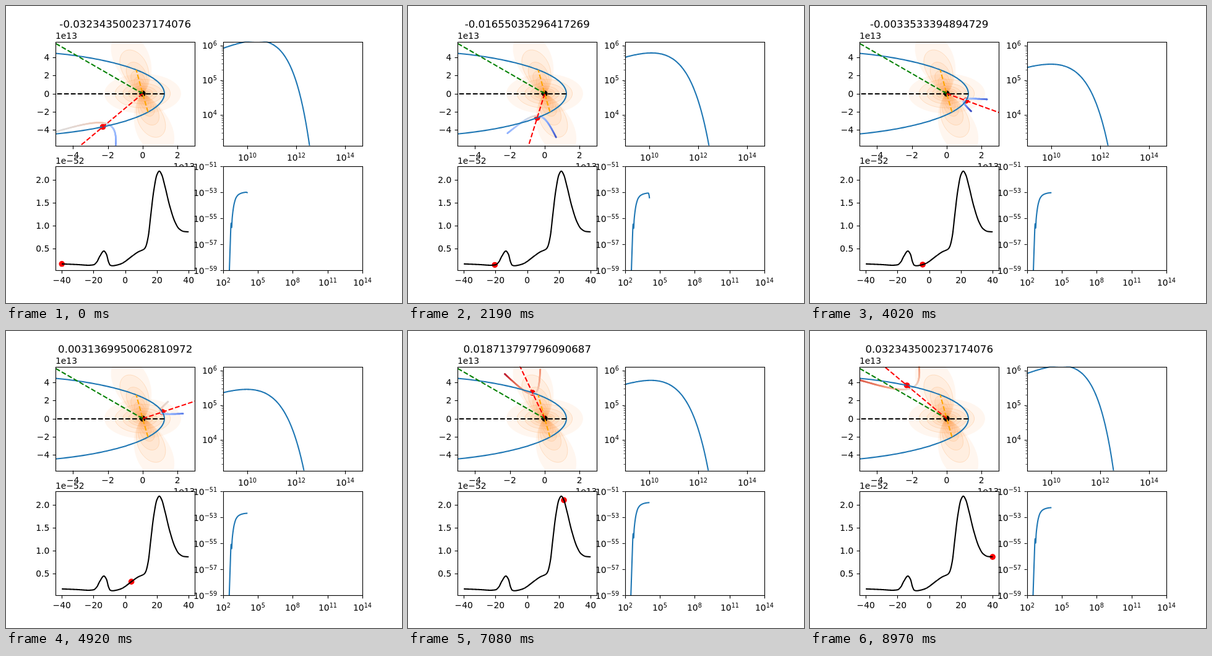
An HTML page with a canvas that plays this animation: 640 by 480 pixels, repeating every 9 s.

```html
<!DOCTYPE html>
<html lang="en">
<head>
<meta charset="utf-8">
<title>Binary orbit and spectra</title>
<style>
html, body { margin: 0; width: 100%; height: 100%; overflow: hidden; background: #fff; }
canvas { display: block; width: 640px; height: 480px; }
</style>
</head>
<body>
<canvas id="c" width="640" height="480"></canvas>
<script>
const g = document.getElementById('c').getContext('2d');
const FONT = '"DejaVu Sans", sans-serif';
const STEPS = 300, STEP_MS = 30;
const DAYS = 40, PERIOD = 1236.724526;
const ECC = 0.874, SEMI = 9.86, SEMI_LATUS = SEMI * (1 - ECC * ECC);
const DISK = 98.5, OBSERVER = 132, RAD = Math.PI / 180;
const BLUE = '#1f77b4', LINE = 2.08, DASH = [7.7, 3.33];

// Panels: left, top, right, bottom
const orbitBox = [80, 57.6, 305.45, 225.6];
const sedBox = [350.55, 57.6, 576, 225.6];
const lightBox = [80, 259.2, 305.45, 427.2];
const fluxBox = [350.55, 259.2, 576, 427.2];

const ox = x => 220.9 + 28.18 * x;
const oy = y => 141.6 - 14.62 * y;
const lx = t => 192.72 + 2.5617 * t;
const ly = f => 428.6 - 73.6 * f;
const sx = e => 350.55 + 39.55 * (e - 9);
const sy = l => 63.5 - 56.1 * (l - 6);
const fx = e => 350.55 + 18.788 * (e - 2);
const fy = e => 259.2 - 21 * (e + 51);

// Shape-preserving cubic through [x, y] points
function curve(pts) {
  const n = pts.length;
  const d = pts.slice(1).map((p, i) => (p[1] - pts[i][1]) / (p[0] - pts[i][0]));
  const m = pts.map((p, i) => {
    if (i === 0) return d[0];
    if (i === n - 1) return d[n - 2];
    const a = d[i - 1], b = d[i];
    return a * b > 0 ? 2 * a * b / (a + b) : 0;
  });
  return x => {
    let i = 0;
    while (i < n - 2 && x > pts[i + 1][0]) i++;
    const h = pts[i + 1][0] - pts[i][0], u = (x - pts[i][0]) / h, v = 1 - u;
    return pts[i][1] * (1 + 2 * u) * v * v + m[i] * h * u * v * v
      + pts[i + 1][1] * u * u * (3 - 2 * u) - m[i + 1] * h * u * u * v;
  };
}

const light = curve([
  [-40, .16], [-30, .145], [-23, .131], [-20, .14], [-18, .2], [-16, .33], [-13.5, .443],
  [-11.9, .375], [-10.5, .2], [-9.4, .13], [-8, .12], [-5, .137], [-2, .173], [0, .215],
  [4, .322], [8, .42], [12, .49], [13, .545], [14.6, .78], [16, 1.2], [18, 1.77],
  [20, 2.12], [21.5, 2.197], [23, 2.12], [25, 1.87], [28, 1.44], [31.4, 1.08],
  [34, .93], [37, .872], [40, .863]
]);
const spectrum = curve([
  [358.6, 500], [361, 427], [362.3, 388], [363.9, 351], [364.7, 358], [365.5, 344],
  [367, 330], [369, 318.5], [372, 309.5], [376, 304.7], [381, 302.3], [386, 301.2], [390.3, 300.8]
]);

const warm = [
  [59, 76, 192], [98, 130, 234], [141, 176, 254], [184, 208, 249], [221, 221, 221],
  [245, 196, 173], [244, 154, 123], [222, 96, 77], [180, 4, 38]
];
function heat(v) {
  const p = Math.max(0, Math.min(.9999, v)) * 8, i = Math.floor(p);
  return 'rgb(' + warm[i].map((a, k) => Math.round(a + (warm[i + 1][k] - a) * (p - i))) + ')';
}

function path(pts) {
  g.beginPath();
  pts.forEach(p => g.lineTo(p[0], p[1]));
}
function stroke(pts, color, dash) {
  path(pts);
  g.strokeStyle = color;
  g.lineWidth = LINE;
  g.lineJoin = 'round';
  g.setLineDash(dash || []);
  g.stroke();
  g.setLineDash([]);
}
function sample(n, fn) {
  return Array.from({ length: n + 1 }, (_, i) => fn(i / n));
}
function dot(x, y, color) {
  g.beginPath();
  g.arc(x, y, 4.8, 0, 2 * Math.PI);
  g.fillStyle = color;
  g.fill();
}
function text(s, x, y, align, size = 13.89) {
  g.font = size + 'px ' + FONT;
  g.textAlign = align;
  g.fillStyle = '#000';
  g.fillText(s, x, y);
}
function power(n, x, y, align) {
  const e = String(n).replace('-', '\u2212');
  g.font = '9.72px ' + FONT;
  const we = g.measureText(e).width;
  g.font = '13.89px ' + FONT;
  const wb = g.measureText('10').width, w = wb + we;
  const left = Math.round(align === 'right' ? x - w : x - w / 2);
  text('10', left, y, 'left');
  text(e, left + wb, y - 5, 'left', 9.72);
}

const snap = v => Math.round(v) + .5;
function tick(box, x, y, len, width) {
  g.beginPath();
  if (y === null) {
    g.moveTo(snap(x), box[3]);
    g.lineTo(snap(x), snap(box[3]) + len);
  } else {
    g.moveTo(box[0], snap(y));
    g.lineTo(snap(box[0]) - len, snap(y));
  }
  g.strokeStyle = '#000';
  g.lineWidth = width;
  g.stroke();
}
function panel(box, draw) {
  const [l, t, r, b] = box;
  g.fillStyle = '#fff';
  g.fillRect(l, t, r - l, b - t);
  g.save();
  g.beginPath();
  g.rect(l, t, r - l, b - t);
  g.clip();
  draw();
  g.restore();
  g.strokeStyle = '#000';
  g.lineWidth = 1.11;
  g.strokeRect(snap(l), snap(t), snap(r) - snap(l), snap(b) - snap(t));
}
function xTicks(box, vals, pos, label) {
  vals.forEach(v => { tick(box, pos(v), null, 4.86, 1.11); label(v, pos(v)); });
}
function yTicks(box, vals, pos, label) {
  vals.forEach(v => { tick(box, null, pos(v), 4.86, 1.11); label(v, pos(v)); });
}
const signed = v => String(v).replace('-', '\u2212');

const polar = (r, deg) => [r * Math.cos(deg * RAD), r * Math.sin(deg * RAD)];
const toOrbit = p => [ox(p[0]), oy(p[1])];
const orbitAt = deg => polar(SEMI_LATUS / (1 + ECC * Math.cos(deg * RAD)), deg);

function stateAt(i) {
  const day = i === STEPS - 1 ? DAYS : i * (2 * DAYS / (STEPS - 1)) - DAYS;
  const phase = day / PERIOD;
  const mean = 2 * Math.PI * phase;
  let E = Math.sign(mean) * Math.cbrt(Math.abs(mean) * 4);
  for (let k = 0; k < 30; k++) E -= (E - ECC * Math.sin(E) - mean) / (1 - ECC * Math.cos(E));
  const x = SEMI * (Math.cos(E) - ECC);
  const y = SEMI * Math.sqrt(1 - ECC * ECC) * Math.sin(E);
  const nu = Math.atan2(y, x) / RAD;
  const bump = c => Math.exp(-((nu - c) ** 2) / 120);
  const dense = 1 + 8 * bump(DISK - 180) + 6.2 * bump(DISK);
  return { phase, day, x, y, nu, r: Math.hypot(x, y), dense };
}

function density() {
  const fill = pts => {
    path(pts);
    g.closePath();
    g.fillStyle = 'rgba(255,140,40,.075)';
    g.fill();
  };
  for (let k = 0; k < 8; k++) {
    const f = .72 ** k;
    const wind = sample(90, q => toOrbit(polar(2.2 * f, 360 * q)));
    const lobe = c => sample(90, q => {
      const d = -60 + 120 * q;
      return toOrbit(polar(6.8 * f * Math.exp(-d * d / 450), c + d));
    });
    [wind, lobe(DISK + 1), lobe(DISK - 179)].forEach(pts => {
      fill(pts);
      if (k) {
        g.strokeStyle = 'rgba(250,160,80,.33)';
        g.lineWidth = .8;
        g.stroke();
      }
    });
  }
}

// Thin-shell shock of two colliding winds, coloured by Doppler boost
function shock(s) {
  const beta = .0103 / s.dense;
  const radius = th => {
    const k = beta * (1 - th / Math.tan(th));
    const th1 = Math.sqrt(22.5 * (Math.sqrt(1 / 9 + 4 * k / 45) - 1 / 3));
    const gap = Math.sin(th + th1);
    return th + th1 < Math.PI ? Math.sin(th1) / gap : 99;
  };
  let lo = .5, hi = 3.1;
  for (let k = 0; k < 40; k++) {
    const mid = (lo + hi) / 2;
    if (radius(mid) > .893) hi = mid; else lo = mid;
  }
  const u = [s.x / s.r, s.y / s.r], eye = polar(1, OBSERVER);
  g.lineWidth = 2.7;
  g.lineCap = 'round';
  for (const side of [-1, 1]) {
    const pts = sample(70, q => {
      const th = Math.max(.005, lo * (1 - (1 - q) ** 1.7));
      const R = radius(th) * s.r, a = -R * Math.cos(th), b = side * R * Math.sin(th);
      return [s.x + a * u[0] - b * u[1], s.y + a * u[1] + b * u[0]];
    });
    let arc = 0;
    for (let i = 1; i < pts.length; i++) {
      const dx = pts[i][0] - pts[i - 1][0], dy = pts[i][1] - pts[i - 1][1];
      const len = Math.hypot(dx, dy);
      arc += len;
      const speed = .5 * Math.sqrt(Math.min(1, arc / s.r));
      const cos = (dx * eye[0] + dy * eye[1]) / len;
      const boost = Math.log(Math.sqrt(1 - speed * speed) / (1 - speed * cos));
      path([toOrbit(pts[i - 1]), toOrbit(pts[i])]);
      g.strokeStyle = heat(.5 + boost / (2 * Math.log(Math.sqrt(3))));
      g.stroke();
    }
  }
  g.lineCap = 'butt';
}

function drawOrbit(s) {
  const zero = toOrbit([0, 0]);
  const ray = (p, color) => stroke([zero, toOrbit(p)], color, DASH);
  density();
  dot(zero[0], zero[1], '#000');
  dot(ox(s.x), oy(s.y), '#f00');
  shock(s);
  stroke(sample(240, q => toOrbit(orbitAt(-150 + 300 * q))), BLUE);
  const axisY = Math.round(zero[1]);
  stroke([[ox(SEMI * (1 - ECC)), axisY], [ox(-6), axisY]], '#000', DASH);
  stroke([toOrbit(orbitAt(DISK - 180)), zero, toOrbit(orbitAt(DISK - .5))], 'orange', DASH);
  ray(polar(10, OBSERVER), 'green');
  ray(polar(10, s.nu), '#f00');
}

function drawSed(s) {
  const top = 107.5 - 61.5 * Math.log10(s.r) + 10 * Math.log10(s.dense);
  const q = Math.max(0, (top - 69) / 31);
  const a = .293 - .05 * q;
  const K = .069 - .035 * Math.exp(-6 * q);
  const b = .5 + .081 * Math.exp(-8 * q);
  stroke(sample(150, w => {
    const v = 4 * w;
    return [sx(9 + v), top - 56.1 * (a * v - K * (10 ** (b * v) - 1))];
  }), BLUE);
}

function drawFlux(s) {
  const shift = -21 * Math.log10(light(s.day) / .16);
  const dip = 9 * Math.exp(-(((s.nu + 85) / 32) ** 4));
  stroke(sample(260, w => {
    const x = 358.6 + 31.7 * w;
    const drop = dip * Math.max(0, (x - 388.3) / 2) ** 2;
    return [x, spectrum(x) + shift + drop];
  }), BLUE);
}

function render(i) {
  const s = stateAt(i);
  g.fillStyle = '#fff';
  g.fillRect(0, 0, 640, 480);

  panel(orbitBox, () => drawOrbit(s));
  xTicks(orbitBox, [-4, -2, 0, 2], ox, (v, x) => text(signed(v), x, 246, 'center'));
  yTicks(orbitBox, [-4, -2, 0, 2, 4], oy, (v, y) => text(signed(v), 70.3, Math.round(y + 5), 'right'));
  text('1e13', 80, 53, 'left');
  text('1e13', 305.4, 264, 'right');
  text(String(s.phase), 192.7, 35, 'center', 16.67);

  panel(sedBox, () => drawSed(s));
  xTicks(sedBox, [10, 12, 14], sx, (v, x) => power(v, x, 250, 'center'));
  yTicks(sedBox, [4, 5, 6], sy, (v, y) => power(v, 340.8, Math.round(y + 5.5), 'right'));
  for (let d = 3; d < 7; d++) {
    for (let m = 2; m < 10; m++) {
      const y = sy(d + Math.log10(m));
      if (y > sedBox[1] && y < sedBox[3]) tick(sedBox, null, y, 2.78, .83);
    }
  }

  panel(lightBox, () => {
    dot(lx(s.day), ly(light(s.day)), '#f00');
    stroke(sample(320, q => [lx(-40 + 80 * q), ly(light(-40 + 80 * q))]), '#000');
  });
  xTicks(lightBox, [-40, -20, 0, 20, 40], lx, (v, x) => text(signed(v), x, 448, 'center'));
  yTicks(lightBox, [.5, 1, 1.5, 2], ly, (v, y) => text(v.toFixed(1), 70.3, Math.round(y + 5), 'right'));
  text('1e\u221252', 80, 255, 'left');

  panel(fluxBox, () => drawFlux(s));
  xTicks(fluxBox, [2, 5, 8, 11, 14], fx, (v, x) => power(v, x, 452, 'center'));
  yTicks(fluxBox, [-59, -57, -55, -53, -51], fy, (v, y) => power(v, 340.8, Math.round(y + 5.5), 'right'));
}

const start = performance.now();
let shown = -1;
function loop() {
  const i = Math.floor((performance.now() - start) / STEP_MS) % STEPS;
  if (i !== shown) render(shown = i);
  requestAnimationFrame(loop);
}
loop();
</script>
</body>
</html>
```
